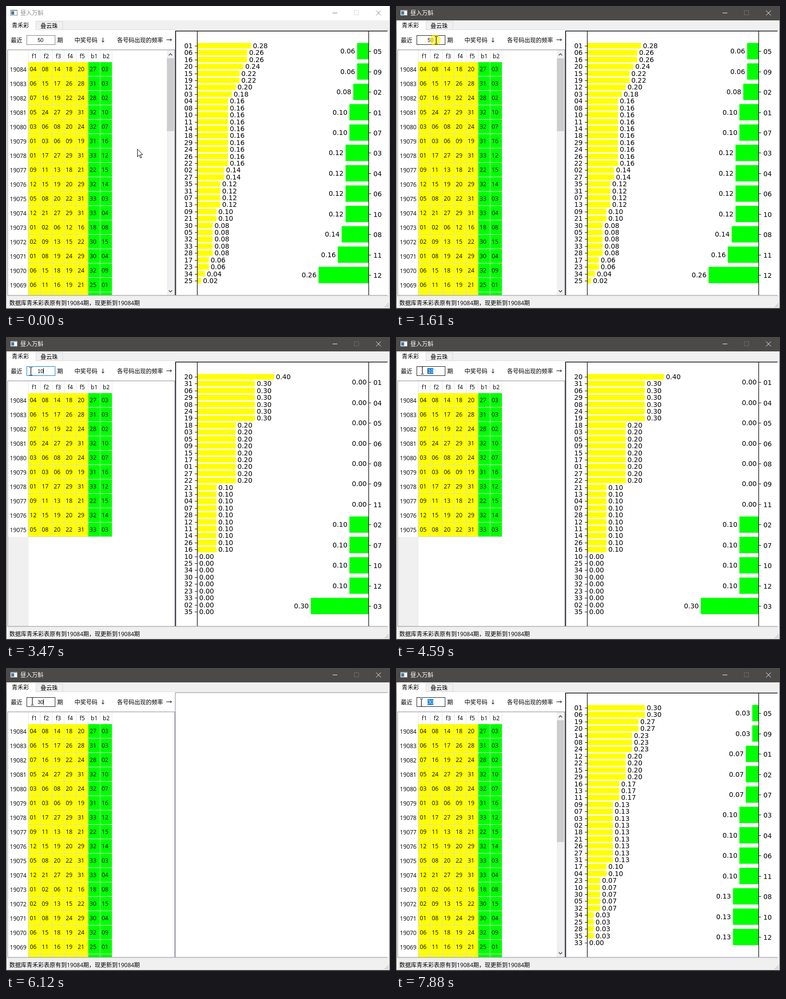
Recreate the animation shown at these times as an HTML page. Size 802x632 px, loop 8 s.

```html
<!DOCTYPE html>
<html lang="zh">
<head>
<meta charset="utf-8">
<style>
html, body { margin: 0; width: 100%; height: 100%; overflow: hidden; background: #f0f0f0; }
svg { display: block; }
text { font: 12px "Open Sans", "Noto Sans CJK SC", "Noto Sans CJK", sans-serif; white-space: pre; }
.num { font-size: 12.2px; }
.plot { font: 13.89px "DejaVu Sans", sans-serif; }
.field { font: 11px "Liberation Sans", sans-serif; }
.end { text-anchor: end; }
.mid { text-anchor: middle; }
</style>
</head>
<body>
<svg id="stage" width="802" height="632" viewBox="0 0 802 632"></svg>
<script>
const LOOP = 8000;
const BLUE = '#0078d7', DARK = '#171717', FRAME = '#828790';
const YELLOW = '#ffff00', GREEN = '#00ff00';

const draws = `04 08 14 18 20 27 03
06 15 17 26 28 31 03
07 16 19 22 24 28 02
05 24 27 29 31 32 10
03 06 08 20 24 32 07
01 03 06 09 19 31 16
01 17 27 29 31 33 12
09 11 13 18 21 22 15
12 15 19 20 29 32 14
05 08 20 22 31 33 03
12 21 27 29 31 33 04
01 02 06 12 16 18 08
02 09 13 15 22 30 15
01 08 19 24 29 30 04
06 15 18 19 24 32 09
06 11 16 19 21 25 01`.split('\n').map(row => row.split(' '));

// Each group reads "hits: balls with that many hits".
const charts = {
  50: {
    front: '14:01|13:06 16|12:20|11:15 19|10:12|9:03|8:04 08 10 11 14 18 29 24 26 22|7:02 27|6:35 31 07 13|5:09 21|4:30 05 32 33 28|3:17 23|2:34|1:25',
    back: '3:05 09|4:02|5:01 07|6:03 04 06 10|7:08|8:11|13:12',
    thumb: 152
  },
  10: {
    front: '4:20|3:31 06 29 08 24 19|2:18 03 05 09 15 17 01 27 22|1:21 13 04 07 28 12 11 14 26 16|0:10 25 34 30 32 23 33 02 35',
    back: '0:01 04 05 06 08 09 11|1:02 07 10 12|3:03'
  },
  30: {
    front: '9:01 06|8:19 20|7:14 08 24|6:12 22 15 29|5:16 13 11|4:09 07 03 02 18 21 26 27 31|3:17 04|2:23 10 30 05 32|1:34 25 28 35|0:33',
    back: '1:05 09|2:01 02 07|3:03 04 06 11|4:08 10 12',
    thumb: 254
  }
};

// Pointer hot spot: time, x, y
const path = [
  [0, 274, 298], [100, 262, 280], [160, 252, 266],
  [490, 245, 256], [600, 222, 226], [715, 190, 186], [825, 155, 146],
  [940, 125, 111], [1050, 103, 88], [1160, 92, 76], [1270, 86, 72],
  [1370, 84, 71], [1490, 83, 71], [1610, 82, 71], [1720, 73, 71], [1830, 66, 70],
  [2040, 56, 70], [2150, 40, 70],
  [3360, 43, 70], [3470, 50, 71], [3580, 62, 71], [3690, 74, 70], [3800, 84, 70],
  [3910, 91, 70], [4030, 94, 70], [4130, 95, 69], [4240, 90, 69], [4360, 74, 69], [4480, 53, 69],
  [6670, 58, 70], [6780, 68, 71], [6890, 80, 72], [7000, 86, 72],
  [7110, 84, 72], [7220, 70, 72], [7330, 57, 72], [7430, 51, 72]
];

const changes = [
  [0, { rows: 50, chart: 50, text: '50', sel: 0, caret: false, edge: '#7a7a7a', active: false, press: false }],
  [1160, { edge: DARK }],
  [1490, { active: true, press: true }],
  [1720, { sel: 1 }],
  [1830, { sel: 2 }],
  [2150, { edge: BLUE }],
  [2260, { press: false }],
  [2590, { text: '', sel: 0, caret: true }],
  [2690, { text: '1' }],
  [2920, { text: '10' }],
  [3250, { rows: 10, chart: 0 }],
  [3360, { chart: 10 }],
  [3580, { edge: DARK }],
  [4130, { press: true }],
  [4360, { sel: 1 }],
  [4480, { sel: 2 }],
  [4590, { press: false }],
  [5140, { caret: false }],
  [5460, { text: '3', sel: 0, caret: true }],
  [5670, { text: '30' }],
  [6120, { rows: 30, chart: 0 }],
  [6340, { chart: 30 }],
  [7000, { press: true }],
  [7220, { sel: 1 }],
  [7330, { sel: 2 }],
  [7660, { press: false }],
  [7880, { caret: false }]
];

const stage = document.getElementById('stage');

function set(node, attrs) {
  for (const key in attrs) node.setAttribute(key, attrs[key]);
  return node;
}
function add(parent, tag, attrs) {
  return parent.appendChild(set(document.createElementNS('http://www.w3.org/2000/svg', tag), attrs));
}
const group = (parent = stage) => add(parent, 'g', {});
const rect = (parent, x, y, width, height, fill) => add(parent, 'rect', { x, y, width, height, fill });
const line = (parent, d, stroke, width = 1) =>
  add(parent, 'path', { d, stroke, 'stroke-width': width, fill: 'none' });
const box = (parent, x, y, w, h, stroke, fill = 'none') =>
  add(parent, 'rect', { x: x + .5, y: y + .5, width: w - 1, height: h - 1, stroke, fill });
function label(parent, x, y, content, cls = '', fill = '#000') {
  const node = add(parent, 'text', { x, y, class: cls, fill });
  node.textContent = content;
  return node;
}
const show = (node, on) => node.setAttribute('visibility', on ? 'visible' : 'hidden');

function drawTitle() {
  const g = group();
  const bar = rect(g, 0, 0, 802, 30, '#fff');
  rect(g, 9, 8, 15, 12, '#8a9096');
  rect(g, 10, 10, 13, 9, '#f4f6f8');
  rect(g, 11, 11, 6, 7, '#4a7aa0');
  const name = label(g, 30, 18.5, '昼入万斛');
  const buttons = line(g, 'M682 14.5H692M773 9.5L783 19.5M783 9.5L773 19.5', '#000');
  const maximize = box(g, 727, 9, 10, 10, '#ddd');
  const border = line(stage, 'M.5 0V631M801.5 0V631M0 630.5H802', '#aaa');
  return active => {
    set(bar, { fill: active ? '#4c4a48' : '#fff' });
    set(name, { fill: active ? '#fff' : '#8c8c8c' });
    set(buttons, { stroke: active ? '#fff' : '#777' });
    set(maximize, { stroke: active ? '#6f6d6b' : '#ddd' });
    set(border, { stroke: active ? '#4c4a48' : '#aaa' });
  };
}

function drawWindow() {
  box(stage, 1, 49, 799, 557, '#dcdcdc', '#fff');
  box(stage, 62, 32, 57, 18, '#d9d9d9', '#f0f0f0');
  rect(stage, 2, 30, 60, 21, '#fff');
  label(stage, 12, 45, '青禾彩');
  label(stage, 72, 45.5, '叠云珠');
  label(stage, 10, 75.5, '最近');
  label(stage, 107, 75.5, '期');
  label(stage, 143, 75.5, '中奖号码');
  label(stage, 232, 75.5, '各号码出现的频率');
  line(stage, 'M202.5 66V75M200 72.5L202.5 75.5L205 72.5M335 70.5H346M343 68L346 70.5L343 73', '#000');
  label(stage, 7, 624, '数据库青禾彩表原有到19084期，现更新到19084期');
  for (let r = 0; r < 3; r++)
    for (let c = 0; c <= r; c++) rect(stage, 797 - 3 * c, 620 + 3 * r, 2, 2, '#bfbfbf');
  rect(stage, 0, 631, 802, 1, '#2b2b2b');
}

function drawTable() {
  const clip = add(stage, 'clipPath', { id: 'tableClip' });
  rect(clip, 4, 92, 348, 511);
  const table = add(stage, 'g', { 'clip-path': 'url(#tableClip)' });
  rect(table, 4, 117, 43, 486, '#f0f0f0');
  ['f1', 'f2', 'f3', 'f4', 'f5', 'b1', 'b2'].forEach((name, c) => {
    label(table, 59.3 + 25 * c, 109, name, 'num mid');
    rect(table, 71 + 25 * c, 92, 1, 25, '#e5e5e5');
  });
  rect(table, 46, 92, 1, 25, '#e5e5e5');
  const top = group(table), rest = group(table);
  for (let r = 0; r < 17; r++) {
    const g = r < 10 ? top : rest, y = 117 + 30 * r;
    rect(g, 4, y, 42, 30, '#fff');
    rect(g, 46, y, 176, 30, '#d8d8d8');
    label(g, 8, y + 19.5, 19084 - r, 'num');
    for (let c = 0; c < 7; c++) {
      rect(g, 47 + 25 * c, y, 24, 29, c < 5 ? YELLOW : GREEN);
      if (draws[r]) label(g, 49.7 + 25 * c, y + 19, draws[r][c], 'num');
    }
  }
  box(stage, 3, 91, 350, 513, FRAME);
  return rows => show(rest, rows > 10);
}

const unpack = spec => spec.split('|').flatMap(part => {
  const [hits, balls] = part.split(':');
  return balls.split(' ').map(ball => ({ ball, hits: +hits }));
});

function drawChart(total, { front, back, thumb }) {
  const g = group();
  unpack(front).forEach(({ ball, hits }, i) => {
    const y = 83 + 14.41 * i, share = hits / total, w = share * 401;
    rect(g, 399.5, y - 5.76, w, 11.52, YELLOW);
    line(g, `M394.5 ${Math.round(y) + .5}H399.5`, '#000');
    label(g, 389.8, Math.round(y) + 5, ball, 'plot end');
    label(g, 403.4 + w, Math.round(y) + 5, share.toFixed(2), 'plot');
  });
  unpack(back).forEach(({ ball, hits }, i) => {
    const y = 94.2 + 42.45 * i, share = hits / total, w = share * 403;
    rect(g, 757.5 - w, y - 17, w, 34, GREEN);
    line(g, `M757.5 ${Math.round(y) + .5}H762.5`, '#000');
    label(g, 767.3, Math.round(y) + 6, ball, 'plot');
    label(g, 753.3 - w, Math.round(y) + 4.5, share.toFixed(2), 'plot end');
  });
  line(g, 'M399.5 52V603M757.5 52V603M354.5 603V52.5H797', '#000', 1.2);
  if (thumb) {
    rect(g, 336, 92, 16, 511, '#f0f0f0');
    rect(g, 336, 109, 15, thumb, '#cdcdcd');
    line(g, 'M340 103L343.5 99.5L347 103M340 593L343.5 596.5L347 593', '#505050', 1.6);
  }
  return g;
}

function drawField() {
  const frame = box(stage, 43, 61, 60, 20, '#7a7a7a', '#fff');
  const mark = rect(stage, 66, 65, 0, 12, BLUE);
  const value = label(stage, 72, 75, '', 'field mid');
  const plain = add(value, 'tspan', { fill: '#000' });
  const picked = add(value, 'tspan', { fill: '#fff' });
  const caret = rect(stage, 78, 65, 1, 12, '#000');
  return s => {
    const split = s.text.length - s.sel;
    const x = 72 + 3 * s.text.length - 6 * s.sel;
    set(frame, { stroke: s.edge });
    set(mark, { x, width: 6 * s.sel });
    plain.textContent = s.text.slice(0, split);
    picked.textContent = s.text.slice(split);
    set(caret, { x });
    show(caret, s.caret);
  };
}

function drawPointer() {
  const g = group();
  const halo = add(g, 'circle', { r: 11.5, fill: '#fff000', 'fill-opacity': .6 });
  const arrow = add(g, 'path', {
    d: 'M.5 .5V16.5L4.2 13L7 19L9.3 18L6.6 12H11.5Z', fill: '#fff', stroke: '#000'
  });
  const beam = line(g, 'M-1 -7.5H1.5M2.5 -7.5H5M2 -7V8M-1 8.5H1.5M2.5 8.5H5', '#000', 1.2);
  return (x, y, press) => {
    const inside = x >= 43 && x < 103 && y > 61 && y < 81;
    set(g, { transform: `translate(${x} ${y})` });
    show(halo, press);
    show(arrow, !inside);
    show(beam, inside);
  };
}

rect(stage, 0, 0, 802, 632, '#f0f0f0');
drawWindow();
const paintTitle = drawTitle();
const paintTable = drawTable();
line(stage, 'M797 51.5H353.5V603.5H797', FRAME);
const plots = Object.entries(charts).map(([total, chart]) => [+total, drawChart(+total, chart)]);
const paintField = drawField();
const paintPointer = drawPointer();

function frame() {
  const t = performance.now() % LOOP;
  const state = Object.assign({}, ...changes.filter(([at]) => at <= t).map(([, change]) => change));
  const [, x, y] = path.filter(([at]) => at <= t).pop();
  paintTitle(state.active);
  paintTable(state.rows);
  plots.forEach(([total, g]) => show(g, total === state.chart));
  paintField(state);
  paintPointer(x, y, state.press);
  requestAnimationFrame(frame);
}
frame();
</script>
</body>
</html>
```
